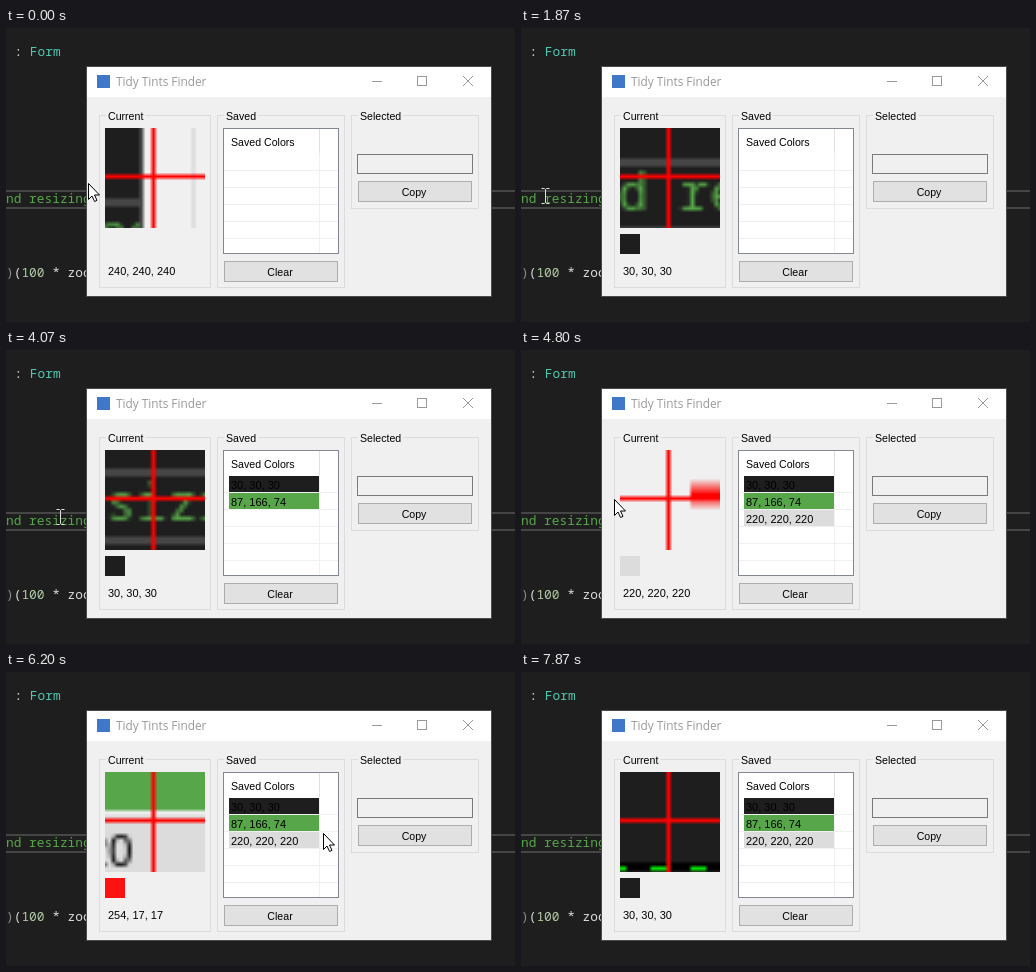
Recreate the animation shown at these times as an HTML page with a canvas. Size 509 by 294 pixels, loop 8000 ms.

```html
<!DOCTYPE html>
<html lang="en">
<head>
<meta charset="utf-8">
<title>Colour picker</title>
<style>
  html, body { margin: 0; width: 100%; height: 100%; overflow: hidden; background: #1e1e1e; }
  canvas { display: block; }
</style>
</head>
<body>
<canvas id="stage" width="509" height="294"></canvas>
<script>
const LOOP = 8000, TICK = 1000 / 15, LAG = 60;
const TOP = 48;              // hidden strip above the stage that the magnifier can reach
const LENS = 26, ZOOM = 4;
const UI = '11px "Liberation Sans", sans-serif';
const LABEL = '10.6px "Liberation Sans", sans-serif';
const CODE = '500 12.83px "Noto Sans Mono", monospace';

// time, x, y of the pointer
const path = [
  [-60, 83, 156], [0, 82, 155], [200, 62, 158], [450, 44, 164], [870, 28, 170],
  [1300, 22, 172], [1700, 18, 168], [1810, 20, 166], [1870, 24, 168], [2330, 40, 166],
  [2810, 40, 166], [2870, 44, 170], [3070, 45, 171], [3930, 45, 171], [4300, 70, 160],
  [4730, 93, 149], [5330, 93, 149], [5800, 146, 150], [6060, 146, 150], [6140, 297, 161],
  [6200, 317, 161], [6450, 372, 158], [6670, 412, 166], [6870, 412, 166], [7140, 411, 168],
  [7200, 405, 169], [7670, 408, 42], [7730, 406, 11], [7805, 405, -13], [7870, 405, -25]
];
const readings = [
  [0, '240, 240, 240'], [100, '30, 30, 30'], [2920, '87, 166, 74'], [3950, '30, 30, 30'],
  [4350, '240, 240, 240'], [4700, '220, 220, 220'], [5350, '240, 240, 240'],
  [5470, '255, 0, 0'], [5750, '254, 17, 17'], [6260, '255, 255, 255'],
  [6340, '240, 240, 240'], [6450, '229, 241, 251'], [7310, '240, 240, 240'],
  [7600, '255, 255, 255'], [7720, '30, 30, 30']
];
const saved = [[2320, '30, 30, 30'], [3590, '87, 166, 74'], [4790, '220, 220, 220']];

const makeCanvas = (width, height) =>
  Object.assign(document.createElement('canvas'), { width, height });
const stage = document.getElementById('stage').getContext('2d');
const scene = makeCanvas(509, 294 + TOP), g = scene.getContext('2d');
const lens = makeCanvas(LENS, LENS), lensCtx = lens.getContext('2d');
g.translate(0, TOP);

function pointerAt(t) {
  const next = path.findIndex(p => p[0] > t);
  if (next < 0) return path[path.length - 1].slice(1);
  if (next === 0) return path[0].slice(1);
  const [t0, x0, y0] = path[next - 1], [t1, x1, y1] = path[next];
  const k = (t - t0) / (t1 - t0);
  return [x0 + (x1 - x0) * k, y0 + (y1 - y0) * k];
}

function rect(x, y, w, h, fill, border) {
  g.fillStyle = fill;
  g.fillRect(x, y, w, h);
  if (border) frame(x, y, w, h, border);
}

function frame(x, y, w, h, color) {
  g.strokeStyle = color;
  g.lineWidth = 1;
  g.strokeRect(x + .5, y + .5, w - 1, h - 1);
}

function text(str, x, y, color = '#000', font = UI, align = 'left') {
  g.font = font;
  g.fillStyle = color;
  g.textAlign = align;
  g.fillText(str, x, y);
}

const inside = ([px, py], x, y, w, h) => px >= x && px < x + w && py >= y && py < y + h;

function group(title, x, y, w, h) {
  frame(x, y, w, h, '#dcdcdc');
  g.font = LABEL;
  rect(x + 7, y, g.measureText(title).width + 4, 1, '#f0f0f0');
  text(title, x + 9, y + 5, '#000', LABEL);
}

function button(label, x, y, pointer) {
  const hot = inside(pointer, x, y, 114, 21);
  rect(x, y, 114, 21, hot ? '#e5f1fb' : '#e1e1e1', hot ? '#0078d7' : '#adadad');
  text(label, x + 56, y + 15, '#000', LABEL, 'center');
}

function drawEditor() {
  rect(0, -TOP, 509, 294 + TOP, '#1e1e1e');
  rect(0, -2, 509, 2, '#000');
  for (let x = 1; x < 509; x += 10) rect(x, -1, 4, 1, '#00e600');
  rect(0, 162, 509, 2, '#464646');
  rect(0, 179, 509, 2, '#464646');
  const cell = 7.7, left = -7;
  text('n', left, 28, '#4ec9b0', CODE);
  text(':', left + 2 * cell, 28, '#dcdcdc', CODE);
  text('Form', left + 4 * cell, 28, '#4ec9b0', CODE);
  text('nd resizing', 0, 175, '#57a64a', CODE);
  text(')', 0, 249, '#8c8c8c', CODE);
  text('(', cell, 249, '#dcdcdc', CODE);
  text('100', 2 * cell, 249, '#b5cea8', CODE);
  text('* zoom', 6 * cell, 249, '#dcdcdc', CODE);
}

function drawTitleBar(pointer) {
  rect(81, 39, 404, 30, '#fff');
  rect(91, 47, 13, 13, '#3f78c8');
  text('Tidy Tints Finder', 110, 58, '#999', '11.8px "Open Sans", sans-serif');
  for (const x of [349, 394])
    if (inside(pointer, x, 39, 45, 30)) rect(x, 39, 45, 30, '#e5e5e5');
  rect(366, 53, 10, 1, '#999');
  frame(411, 48, 10, 10, '#999');
  g.beginPath();
  g.moveTo(457, 48); g.lineTo(467, 58);
  g.moveTo(467, 48); g.lineTo(457, 58);
  g.stroke();
}

function drawWindow(t, pointer) {
  rect(80, 38, 406, 231, '#f0f0f0', '#4a4a4a');
  drawTitleBar(pointer);
  group('Current', 93, 87, 112, 173);
  group('Saved', 211, 87, 128, 173);
  group('Selected', 345, 87, 128, 94);

  const reading = readings.filter(r => r[0] <= t).pop()[1];
  rect(99, 206, 20, 20, `rgb(${reading})`);
  text(reading, 102, 247);

  rect(217, 100, 116, 126, '#fff', '#828790');
  for (let y = 142; y < 225; y += 17) rect(218, y, 114, 1, '#f0f0f0');
  rect(313, 101, 1, 124, '#f0f0f0');
  rect(313, 101, 1, 24, '#e0e0e0');
  text('Saved Colors', 225, 118, '#000', LABEL);
  saved.forEach(([time, color], i) => {
    if (t < time) return;
    rect(223, 126 + 17 * i, 90, 16, `rgb(${color})`);
    text(color, 225, 139 + 17 * i);
  });

  rect(351, 126, 116, 20, '#f0f0f0', '#7a7a7a');
  button('Copy', 352, 153, pointer);
  button('Clear', 218, 233, pointer);
}

// Repeated passes let the magnifier see its own picture.
function drawMagnifier([px, py]) {
  const x = Math.round(px) - 12, y = Math.round(py) - 12 + TOP;
  for (let pass = 0; pass < 3; pass++) {
    lensCtx.drawImage(scene, x, y, LENS, LENS, 0, 0, LENS, LENS);
    lensCtx.fillStyle = '#f00';
    lensCtx.fillRect(12, 0, 1, LENS);
    lensCtx.fillRect(0, 12, LENS, 1);
    g.save();
    g.beginPath();
    g.rect(99, 100, 100, 100);
    g.clip();
    g.drawImage(lens, 97.5, 98.5, LENS * ZOOM, LENS * ZOOM);
    g.restore();
  }
}

const arrow = new Path2D('M.5 .5V16.5L4 13L6.6 18.5L9 17.4L6.5 12H11.5Z');
const beam = new Path2D('M-4 -7.5H-1L0 -6.5L1 -7.5H4M0 -6.5V6.5M-4 7.5H-1L0 6.5L1 7.5H4');

function drawPointer(p) {
  stage.save();
  stage.translate(Math.round(p[0]), Math.round(p[1]));
  stage.lineWidth = 1;
  if (inside(p, 81, 39, 404, 229)) {
    stage.fillStyle = '#fff';
    stage.strokeStyle = '#000';
    stage.fill(arrow);
    stage.stroke(arrow);
  } else {
    stage.translate(.5, 0);
    stage.strokeStyle = '#e1e1e1';
    stage.stroke(beam);
  }
  stage.restore();
}

function render(now) {
  const t = Math.floor(now % LOOP / TICK) * TICK;
  const pointer = pointerAt(t);
  drawEditor();
  drawWindow(t, pointer);
  drawMagnifier(pointerAt(t - LAG));
  stage.drawImage(scene, 0, -TOP);
  drawPointer(pointer);
}

const start = performance.now();
function loop() {
  render(performance.now() - start);
  requestAnimationFrame(loop);
}
loop();
</script>
</body>
</html>
```
